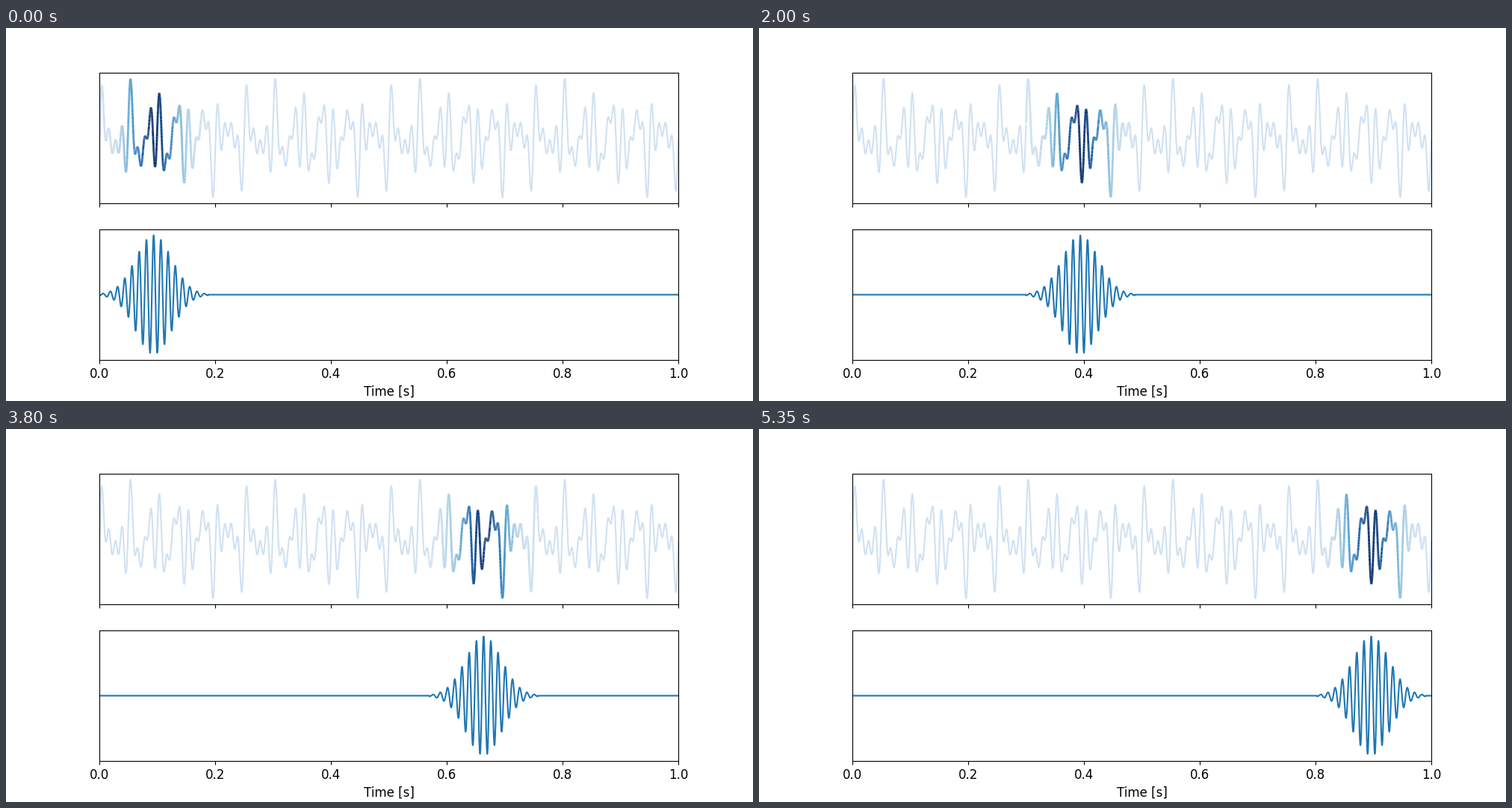
A matplotlib script that plays this animation: 1000 by 500 pixels, repeating every 5400 ms.

```python
import numpy as np
import matplotlib.pyplot as plt
from matplotlib.animation import FuncAnimation
from matplotlib.collections import LineCollection

plt.rcParams["font.family"] = "DejaVu Sans"
plt.rcParams["font.size"] = 12

RATE = 8000                 # samples per second
FREQ = 80                   # wavelet frequency in Hz
SIGMA = 2.5 / FREQ
HALF = int(3 * SIGMA * RATE)
STEP = 60                   # samples per frame
FRAMES, INTERVAL = 108, 50

time = np.arange(RATE) / RATE
signal = sum(np.sin(2 * np.pi * f * time) for f in (24, 40, 60, 80))

lag = np.arange(-HALF, HALF + 1) / RATE
envelope = np.exp(-lag ** 2 / (2 * SIGMA ** 2))
wavelet = envelope * np.cos(2 * np.pi * FREQ * lag)

blues = plt.get_cmap("Blues")
pale = blues(0.2)

fig, (top, bottom) = plt.subplots(2, 1, sharex=True, figsize=(10, 5), dpi=100)
for ax, peak in ((top, signal.max()), (bottom, 1)):
    ax.set_xlim(0, 1)
    ax.set_ylim(-1.1 * peak, 1.1 * peak)
    ax.set_yticks([])
bottom.set_xlabel("Time [s]")

before, = top.plot([], [], color=pale, lw=1.5)
after, = top.plot([], [], color=pale, lw=1.5)
window = LineCollection([], colors=blues(0.2 + 0.8 * envelope[:-1]), linewidths=2)
top.add_collection(window, autolim=False)
moving, = bottom.plot([], [], color="#1f77b4", lw=1.5)


def update(frame):
    start = frame * STEP
    stop = start + len(lag)
    before.set_data(time[:start], signal[:start])
    after.set_data(time[stop:], signal[stop:])
    points = np.column_stack([time[start:stop], signal[start:stop]])
    window.set_segments(np.stack([points[:-1], points[1:]], axis=1))
    trace = np.zeros(RATE)
    trace[start:stop] = wavelet
    moving.set_data(time, trace)
    return before, after, window, moving


anim = FuncAnimation(fig, update, frames=FRAMES, interval=INTERVAL,
                     repeat=True, repeat_delay=0, blit=False)
plt.show()
```
